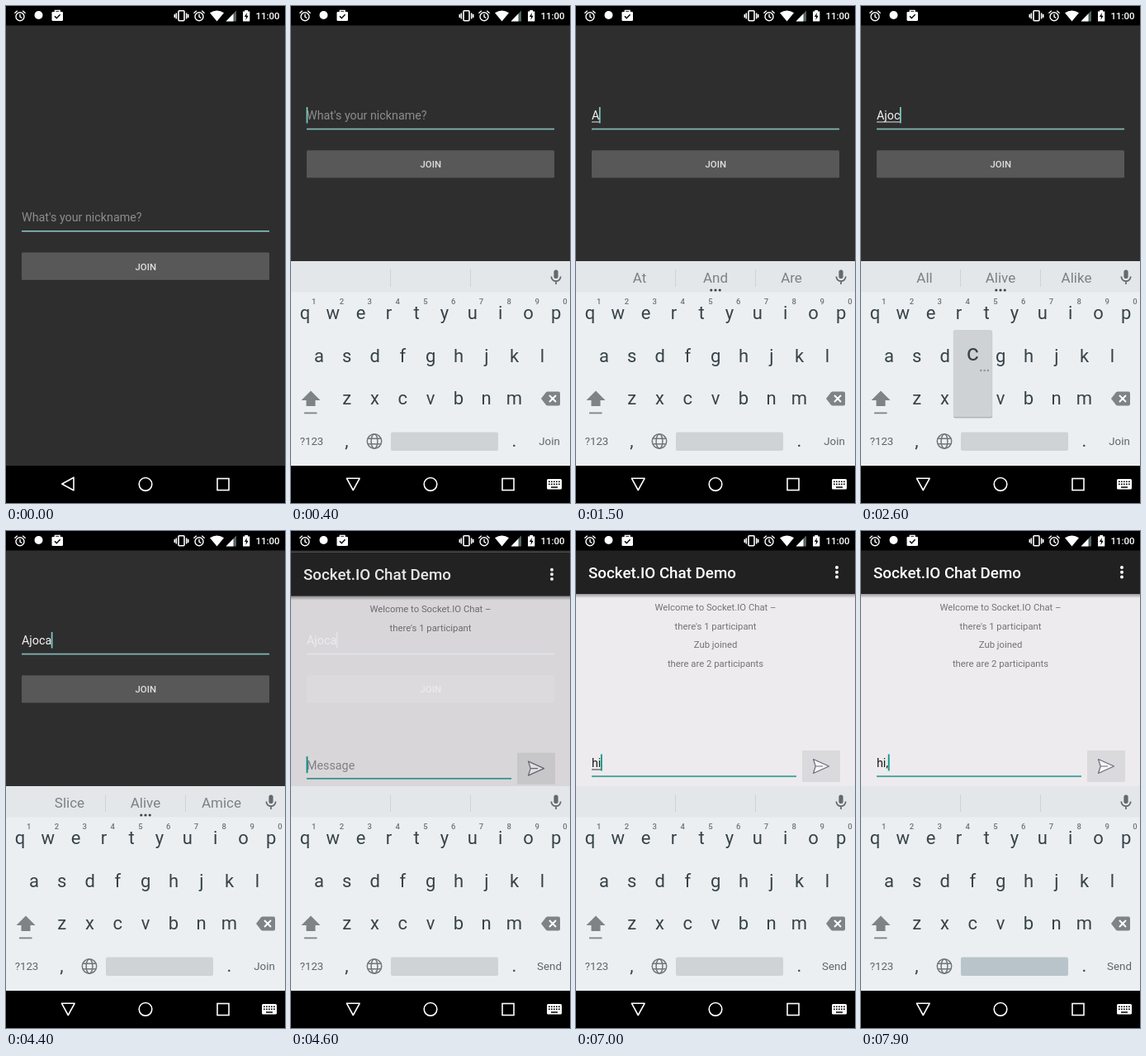
These frames come from a looping animation (338 px wide and 600 px high, 8000 ms). An HTML page:

```html
<!DOCTYPE html>
<html lang="en">
<head>
<meta charset="utf-8">
<title>Chat demo</title>
<style>
html, body { margin: 0; width: 100%; height: 100%; overflow: hidden; background: #000; }
svg { display: block; width: 100vw; height: 100vh; font-family: Roboto, sans-serif; }
text { white-space: pre; }
.mid { text-anchor: middle; }
.med { font-weight: 500; }
.field { font-size: 14.3px; }
.log { font-size: 11.3px; fill: #747274; text-anchor: middle; }
.key { font-size: 22px; fill: #37434a; text-anchor: middle; }
.num { font-size: 9.5px; fill: #6d7478; text-anchor: middle; font-weight: 500; }
.fn { font-size: 13.3px; fill: #5c656a; text-anchor: middle; }
.sug { font-size: 17px; fill: #7b8286; text-anchor: middle; }
.line { fill: none; stroke: #fff; stroke-width: 1.6; }
</style>
</head>
<body>
<svg viewBox="0 0 338 600" preserveAspectRatio="none">
  <defs>
    <linearGradient id="shade" x2="0" y2="1">
      <stop offset="0" stop-color="#000" stop-opacity=".35"/>
      <stop offset="1" stop-color="#000" stop-opacity="0"/>
    </linearGradient>
    <g id="alarm" fill="none" stroke="#fff" stroke-width="1.4">
      <circle cy=".7" r="5"/>
      <path d="M0-2.3V1L2.4 2.5M-6.6-3.3L-3.2-6.2M6.6-3.3L3.2-6.2"/>
    </g>
  </defs>

  <rect y="23" width="338" height="532" fill="#2e2e2e"/>
  <g id="login">
    <text id="hint" class="field" x="19" y="137" fill="#8b8d8d">What's your nickname?</text>
    <text id="nick" class="field" x="19" y="137" fill="#f4f4f4"></text>
    <rect id="nickLine" x="19" y="139.5" height="1" fill="#e4e4e4"/>
    <rect id="nickCaret" y="122" width="1.7" height="19.5" fill="#80cbc4"/>
    <rect x="19" y="147.7" width="300" height="1.7" fill="#83b9b6"/>
    <rect x="19" y="174.3" width="300" height="34" rx="1.5" fill="#595859"/>
    <rect x="19" y="207.5" width="300" height="1" fill="#252525"/>
    <text class="mid med" x="169.3" y="195.3" font-size="11.4" fill="#dedede">JOIN</text>
  </g>

  <g id="chat">
    <rect y="23" width="338" height="320" fill="#edebee"/>
    <rect y="76" width="338" height="5" fill="url(#shade)"/>
    <rect y="23" width="338" height="53" fill="#212121"/>
    <text class="med" x="15" y="56.7" font-size="18.75" fill="#fff">Socket.IO Chat Demo</text>
    <g fill="#fff"><circle cx="316" cy="44" r="2"/><circle cx="316" cy="49.7" r="2"/><circle cx="316" cy="55.4" r="2"/></g>
    <text class="log" x="169" y="95.5">Welcome to Socket.IO Chat –</text>
    <text class="log" x="169" y="118.5">there's 1 participant</text>
    <g id="joined">
      <text class="log" x="169" y="141.3">Zub joined</text>
      <text class="log" x="169" y="164.3">there are 2 participants</text>
    </g>
    <text id="msgHint" class="field" x="19" y="285" fill="#8d8b8e">Message</text>
    <text id="msg" class="field" x="19" y="285" fill="#1c1c1c"></text>
    <rect id="msgLine" x="19" y="287.5" height="1" fill="#333"/>
    <rect id="msgCaret" y="269.5" width="1.8" height="20" fill="#009688"/>
    <rect x="19" y="295.3" width="248" height="1.8" fill="#3f9f98"/>
    <rect x="274" y="265" width="46" height="38" rx="1" fill="#dad9db"/>
    <path d="M287.5 275.5L306.5 284L287.5 292.5L290.2 284ZM290.2 284H299" fill="#f6f5f8" stroke="#6c6b7d" stroke-width="1.2" stroke-linejoin="round"/>
  </g>

  <g id="board">
    <rect y="308" width="338" height="247" fill="#eceff1"/>
    <rect y="308" width="338" height="37.5" fill="#e3e7e9"/>
    <path d="M120.5 318V339M217.5 318V339" stroke="#cfd3d6"/>
    <g id="sugs">
      <text class="sug" x="77" y="334.3"></text>
      <text class="sug" x="169" y="334.3"></text>
      <text class="sug" x="261" y="334.3"></text>
      <g fill="#3c4347"><circle cx="163.8" cy="343" r="1.6"/><circle cx="169" cy="343" r="1.6"/><circle cx="174.2" cy="343" r="1.6"/></g>
    </g>
    <g stroke="#63696d" fill="none" stroke-width="1.7">
      <rect x="318.4" y="318.6" width="5.2" height="10.4" rx="2.6" fill="#63696d" stroke="none"/>
      <path d="M315.3 326.5a5.7 5.7 0 0 0 11.4 0M321 332.3V336"/>
    </g>
    <g id="keys"></g>
    <g fill="#7d8387">
      <path d="M24 464.5L35.5 476H29.5V483H18.5V476H12.5Z"/>
      <rect x="16" y="490.5" width="15.5" height="1.8"/>
      <path d="M303 474L309 466.3Q309.8 465.5 311 465.5H324Q326 465.5 326 467.5V480.5Q326 482.5 324 482.5H311Q309.8 482.5 309 481.7Z"/>
    </g>
    <path d="M313 470L321 478M321 470L313 478" stroke="#fff" stroke-width="2"/>
    <g fill="none" stroke="#70777b" stroke-width="1.5">
      <circle cx="101" cy="525.5" r="8.7"/><ellipse cx="101" cy="525.5" rx="3.9" ry="8.7"/>
      <path d="M93 522.3H109M93 528.7H109"/>
    </g>
    <rect id="space" x="121" y="514.5" width="130" height="22.5" rx="2"/>
    <text class="fn" x="25" y="530.3">?123</text>
    <text class="key" x="67.5" y="532">,</text>
    <text class="key" x="270.3" y="532">.</text>
    <text id="enter" class="fn" x="313" y="530.3"></text>
    <g id="pop">
      <rect x="-23.2" y="-82" width="47" height="105.5" rx="2" fill="#000" opacity=".25"/>
      <rect x="-23.5" y="-83" width="47" height="105" rx="2" fill="#ced2d5"/>
      <text class="key" y="-46" style="font-size:28px"></text>
      <g fill="#8c9498"><circle cx="10" cy="-34" r="1.2"/><circle cx="14.3" cy="-34" r="1.2"/><circle cx="18.6" cy="-34" r="1.2"/></g>
    </g>
  </g>

  <rect width="338" height="23.5"/>
  <use href="#alarm" x="17" y="12"/>
  <circle cx="39.5" cy="11" r="5" fill="#fff"/>
  <path d="M59.5 7.5V5.5H65V7.5" class="line"/>
  <rect x="55.5" y="7" width="13.5" height="11" rx="1.3" fill="#fff"/>
  <path d="M59 12.3L61.3 14.7L65.6 10.3" fill="none" stroke="#000" stroke-width="1.4"/>
  <rect x="209" y="5.8" width="7" height="12" rx="1" class="line"/>
  <path d="M206.3 8.5V15.5M204.3 10V14M218.7 8.5V15.5M220.7 10V14" class="line" stroke-width="1.2"/>
  <use href="#alarm" x="234" y="12"/>
  <path d="M247 8.2Q255.5 2.8 264 8.2L255.5 18.5Z" fill="#fff"/>
  <path d="M266.5 18.5H279V5.5Z" fill="#546467"/>
  <path d="M266.5 18.5H275.5V9.2Z" fill="#fff"/>
  <path d="M287 6.5H289.3V5H293V6.5H295.3V18.5H287Z" fill="#fff"/>
  <path d="M292 8L288.8 13H291L290.4 17L293.6 11.8H291.4Z"/>
  <text class="med" x="302.5" y="16" font-size="11.4" fill="#fff">11:00</text>

  <rect y="555" width="338" height="45"/>
  <path id="back" class="line" stroke-linejoin="round" d="M67.8 577L82 569.2V584.8Z"/>
  <circle class="line" cx="169" cy="577.3" r="7.8"/>
  <rect class="line" x="256" y="570.5" width="14" height="14"/>
  <g id="switch">
    <rect x="310" y="571" width="18" height="12.5" rx="1.5" fill="#fff"/>
    <path d="M312 574.3H326M312 577.3H326" stroke="#000" stroke-width="1.6" stroke-dasharray="1.7 1.3"/>
    <path d="M315 581H323" stroke="#000" stroke-width="1.5"/>
  </g>
</svg>
<script>
const $ = id => document.getElementById(id);
const LOOP = 8000;
const place = {};

function addText(cls, x, y, s) {
  const e = document.createElementNS("http://www.w3.org/2000/svg", "text");
  e.setAttribute("class", cls);
  e.setAttribute("x", x);
  e.setAttribute("y", y);
  e.textContent = s;
  $("keys").append(e);
  return e;
}

const letters = [];
["qwertyuiop", "asdfghjkl", "zxcvbnm"].forEach((row, r) => {
  [...row].forEach((ch, i) => {
    const x = [17, 34, 67.7][r] + 33.8 * i, y = 378 + 51.5 * r;
    place[ch] = [x, y - 7];
    letters.push([addText("key", x, y, ch), ch]);
    if (r === 0) addText("num", x + 10.7, 360.3, (i + 1) % 10);
  });
});
place[","] = [67.5, 526];

// Each list holds [start time, value]; the latest one that has begun applies.
const nickText = [[0, ""], [1300, "A"], [1900, "Aj"], [2200, "Ajo"], [2600, "Ajoc"], [2900, "Ajoca"]];
const msgText = [[0, ""], [6500, "h"], [6800, "hi"], [7400, "hi,"]];
const pops = [[0, ""], [1300, "A"], [1500, ""], [1900, "j"], [2100, ""], [2200, "o"], [2400, ""],
  [2600, "c"], [2800, ""], [2900, "a"], [3100, ""], [6500, "h"], [6700, ""],
  [6800, "i"], [7000, ""], [7400, ","], [7600, ""]];
const words = [[0, ""], [1500, "At And Are"], [2100, "All Al Also"], [2400, "All Alive Alike"],
  [3100, "Slice Alive Amice"], [4600, ""], [7100, "Hi hi his"], [7600, ""]];
const caret = [[0, 0], [100, 1], [1000, 0], [1300, 1], [3300, 0], [3400, 1], [5700, 0], [6300, 1]];

const at = (list, t) => list.filter(e => e[0] <= t).pop()[1];
const ramp = (t, a, b) => Math.min(1, Math.max(0, (t - a) / (b - a)));
const ease = p => 1 - (1 - p) ** 2;
const show = (id, on) => $(id).style.opacity = +on;
const move = (id, x, y) => $(id).setAttribute("transform", `translate(${x} ${y})`);

function typeIn(id, hint, value, composing) {
  $(id).textContent = value;
  const w = value ? $(id).getComputedTextLength() : 0;
  $(id + "Line").setAttribute("width", composing ? w : 0);
  $(id + "Caret").setAttribute("x", 18.6 + w);
  show(hint, !value);
}

function render(t) {
  const rise = ease(ramp(t, 100, 400));
  move("board", 0, 247 * (1 - rise));
  show("board", rise > 0);
  show("switch", rise > 0.5);
  $("back").setAttribute("transform", `rotate(${-90 * rise} 75.3 577)`);
  move("login", 0, t < 300 ? 123.3 : 0);

  const open = ramp(t, 4400, 4700);
  move("chat", 0, 24 * (1 - ease(open)));
  show("chat", ease(open));
  show("joined", ramp(t, 5800, 6100));

  typeIn("nick", "hint", at(nickText, t), t < 4400);
  typeIn("msg", "msgHint", at(msgText, t), t < 7400);
  show("nickCaret", at(caret, t));
  show("msgCaret", at(caret, t));

  const upper = t >= 1000 && t < 1500;
  letters.forEach(([e, ch]) => e.textContent = upper ? ch.toUpperCase() : ch);
  const list = at(words, t).split(" ");
  show("sugs", list.length > 1);
  document.querySelectorAll("#sugs text").forEach((e, i) => e.textContent = list[i] || "");
  $("enter").textContent = t < 4600 ? "Join" : "Send";
  $("space").setAttribute("fill", t >= 7900 ? "#b9c4ca" : "#d0d3d6");

  const ch = at(pops, t);
  show("pop", ch);
  $("pop").style.display = ch ? "" : "none";
  if (ch) {
    move("pop", ...place[ch.toLowerCase()]);
    $("pop").querySelector("text").textContent = ch;
  }
  if (ch) show("pop", 1);
}

function tick() {
  render(Math.floor(performance.now() % LOOP / 100) * 100);
  requestAnimationFrame(tick);
}
tick();
</script>
</body>
</html>
```
